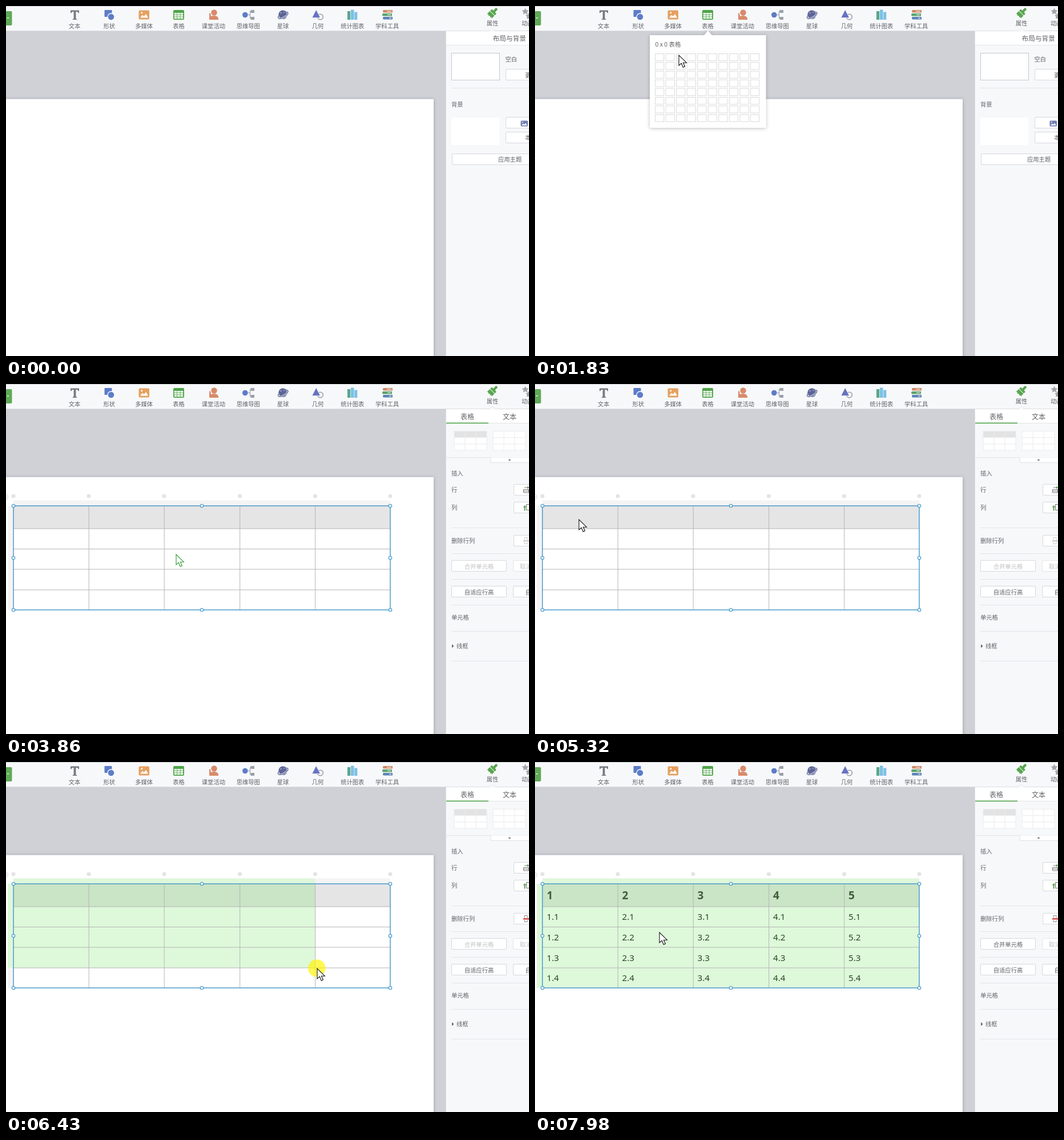
An HTML page for the animation above (8 s loop, 916x612 px).

```html
<!DOCTYPE html>
<html lang="zh">
<head>
<meta charset="utf-8">
<title>Insert table</title>
<style>
html, body { margin: 0; width: 100%; height: 100%; overflow: hidden; background: #d0d1d6; }
svg { display: block; }
text { font-family: "Noto Sans CJK SC", "Noto Sans CJK", "Noto Sans", sans-serif; }
.cell { font-family: "Noto Sans", "Open Sans", sans-serif; }
</style>
</head>
<body>
<svg id="stage" width="916" height="612" viewBox="0 0 916 612"></svg>
<script>
const LOOP = 8000;
const COLS = [13, 145, 277, 409.5, 541.5, 673];
const ROWS = [213, 253, 288.5, 324, 360, 395];
const BLUE = '#3f95c9', GREEN = '#58a64f', INK = '#606266';
const GRID = { x: 210.5, y: 83.5, dx: 18.55, dy: 15.2, cols: 10, rows: 8 };

// Screen updates come in bursts: start, end, number of steps.
const BURSTS = [
  [70, 860, 11], [970, 1730, 11], [1830, 2590, 11], [2690, 3070, 6], [3470, 3560, 2],
  [3710, 3860, 3], [3940, 4450, 7], [4520, 5320, 10], [5380, 5450, 2], [5640, 6430, 11],
  [6490, 6630, 3], [6890, 6970, 2], [7110, 7850, 10], [7940, 7980, 2]
];

// Pointer path: time, x, y.
const PATH = [
  [70, 545, 402], [400, 440, 225], [700, 320, 45], [860, 302, 16], [1050, 302, 16],
  [1400, 280, 46], [1730, 253, 78], [1760, 253, 78], [1830, 252, 86], [2200, 270, 112],
  [2590, 287, 135], [2690, 287, 137], [2960, 287, 147], [3560, 287, 147], [3710, 289, 180],
  [3860, 298, 298], [4080, 262, 306], [4450, 130, 246], [4520, 118, 244], [5320, 77, 237],
  [5560, 77, 237], [5640, 92, 240], [6000, 290, 292], [6340, 505, 350], [6430, 545, 361],
  [6630, 605, 370], [7030, 605, 370], [7110, 603, 374], [7260, 560, 385], [7560, 400, 362],
  [7850, 248, 319], [7980, 218, 298]
];

const range = n => [...Array(n).keys()];
const rect = (x, y, w, h, fill, more = '') =>
  `<rect x="${x}" y="${y}" width="${w}" height="${h}" fill="${fill}" ${more}/>`;
const circle = (x, y, r, fill, more = '') => `<circle cx="${x}" cy="${y}" r="${r}" fill="${fill}" ${more}/>`;
const path = (d, fill, more = '') => `<path d="${d}" fill="${fill}" ${more}/>`;
const line = (d, color, w = 1) => path(d, 'none', `stroke="${color}" stroke-width="${w}"`);
// y is the middle of the glyphs
const label = (s, x, y, size = 10.3, more = '') =>
  `<text x="${x}" y="${y + size * .38}" font-size="${size}" fill="${INK}" ${more}>${s}</text>`;
const mid = 'text-anchor="middle"';
const button = (x, y, w, h = 19, color = '#d6d8dc') =>
  rect(x + .5, y + .5, w, h, '#fff', `stroke="${color}" rx="1.5"`);
const rule = (y, x = 780) => line(`M${x} ${y + .5}H916`, '#e2e4e7');

function icons() {
  return path('M113 7.5h15v4.8h-1.5q-.4-2.4-2.4-2.4h-1.7v11.3q0 1.5 2 1.7v1.1h-7.8v-1.1q2-.2 2-1.7V9.9h-1.7q-2 0-2.4 2.4H113z', '#777b80')
    + rect(172.5, 7, 13, 12, '#5d7cc8', 'rx="1"') + circle(184, 19, 6, '#5d7cc8', 'stroke="#f7f8fa" stroke-width="1.4"')
    + rect(232.5, 7.5, 18.5, 16, '#e5a160', 'rx="2"') + path('M235 20.5l4-5 2.6 2.6 3.6-4 3.8 6.4z', '#fff') + circle(237.8, 11.8, 1.5, '#fff')
    + rect(293, 7, 19, 17, '#4ea548', 'rx="2"')
    + range(9).map(i => rect(294.7 + i % 3 * 5.4, 12 + (i / 3 | 0) * 3.7, 4.6, 2.8, '#fff')).join('')
    + circle(364.5, 11.5, 5.2, '#d98a6b') + path('M356 24v-11.5q1.6-.8 2.2.8l.8 4.7q5.5-2 9.5-.2 3.5 1.2 3.7 6.2z', '#d98a6b')
    + line('M424 15.5h3.5M431 9.5h-3.5v12h3.5', '#8c96a8') + circle(418.8, 15.5, 4.8, '#5d7cc8')
    + rect(428.5, 7, 6.5, 5, '#9aa0a8') + rect(428.5, 19, 6.5, 5, '#9aa0a8')
    + circle(485, 15.2, 7.8, '#5c6596') + circle(481.5, 12, 1.6, '#8f97bd') + circle(487, 11, 1.2, '#8f97bd')
    + '<g transform="rotate(-28 485 16)">' + line('M478 13.5C472 17 477 20.3 485 20.3S498 17 492 13.5', '#f7f8fa', 3)
    + line('M478 13.5C472 17 477 20.3 485 20.3S498 17 492 13.5', '#5c6596', 1.4) + '</g>'
    + circle(550.5, 19, 4.8, 'none', 'stroke="#9a9ca4" stroke-width="1.6"')
    + path('M536 20.5L543.2 6.5 550.5 20.5z', '#6672c2', 'stroke="#f7f8fa" stroke-width=".7"')
    + rect(598, 9, 5.2, 15, '#58a78d') + rect(604, 6.5, 5.5, 17.5, '#7cc0e4') + rect(610.3, 10.5, 5, 13.5, '#7cc0e4')
    + [['#d08866', 660, 7], ['#58a36c', 659, 13], ['#5b83b5', 660, 19]].map(([c, x, y], i) =>
        path(`M${x + 1} ${y}h16v4.6h-16q-2-2.3 0-4.6z`, c) + rect(x + 7 + i * 2, y + 1.6, 8 - i * 2, 1.2, '#f1ece6')).join('');
}

function toolbar() {
  const names = ['文本', '形状', '多媒体', '表格', '课堂活动', '思维导图', '星球', '几何', '统计图表', '学科工具'];
  return rect(0, 0, 916, 43, '#f7f8fa') + rect(0, 0, 916, 1, '#cdcfd3') + rect(0, 43, 916, 1, '#dcdee2')
    + rect(-4, 9, 14.5, 25, '#5fa957', 'rx="2"') + path('M1.5 20h4l-2 2z', '#fff')
    + icons() + names.map((s, i) => label(s, 120 + i * 60.85, 35, 10.3, mid)).join('')
    + `<g transform="rotate(45 852 12)">${rect(850, 1, 4.4, 8, '#58a64f', 'rx="1.5"')}${rect(846.5, 8.2, 11.5, 4, '#58a64f', 'rx="1"')}${path('M846.5 13.2h11.5v6.5l-2-1.2-1.5 1.8-2-1.6-2 1.8-1.8-1.6-2.2 1z', '#58a64f')}</g>`
    + label('属性', 852, 30.5, 10.3, mid) + label('动画', 903, 30.5)
    + path('M909.5 3.5l1.8 3.8 4.2.5-3 2.9.8 4.1-3.8-2-3.7 2 .7-4.1-3-2.9 4.2-.5z', '#a2a5aa')
    + path('M914.5 12l1.5 3v7l-4 0 .5-3.5-2.5-2.5 3.5-.5z', '#a2a5aa')
    + path('M846 44l6-4.5 6 4.5z', '#fff', 'stroke="#dcdee2" stroke-width=".8"') + rect(845, 44, 14, 2, '#fff');
}

function slidePanel() {
  return rect(771, 44, 145, 25, '#fff') + rule(68, 771) + label('布局与背景', 852.5, 57, 11.7)
    + rect(780.5, 82.5, 84, 47, '#fff', 'stroke="#c6c8cc"') + label('空白', 874.5, 93)
    + button(875, 110, 60) + label('更换布局', 909, 121) + rule(143) + label('背景', 780, 172.5)
    + rect(780, 195, 84, 48, '#fff') + button(875, 194, 60) + button(875, 220, 60)
    + rect(901.5, 200.5, 12.5, 10, '#6f7db3', 'rx="1.5"') + path('M903 208.8l3-3.4 2 1.8 2.3-2.5 2.4 4.1z', '#fff') + circle(904.7, 203.3, 1, '#fff')
    + label('本地图片', 909, 230.5) + button(781, 258, 150) + label('应用主题', 862, 268.5);
}

function thumb(x, head) {
  const grid = range(4).map(i => `M${x + i * 19} 82.5v33.5M${x} ${82.5 + i * 11.17}h57`).join('');
  return rect(x, 82.5, 57, 33.5, '#fff') + (head ? rect(x, 82.5, 57, 10.5, '#e3e3e3') : '') + line(grid, '#ebebec');
}

function tablePanel() {
  return rect(771, 44, 145, 25, '#fff') + rule(68, 771) + rect(771, 67.5, 74, 1.7, GREEN)
    + label('表格', 808, 57, 12, mid) + label('文本', 882, 57, 12, mid)
    + thumb(785, true) + thumb(853, false) + rule(128, 771)
    + path('M849 128.5v7q0 2 2 2h66v-9', '#fff', 'stroke="#dddfe3"') + path('M879.5 132h5l-2.5 2.6z', '#666')
    + label('插入', 780, 156) + label('行', 780, 185.5) + label('列', 780, 216)
    + [175, 206, 264].map(y => button(889, y, 40)).join('')
    + line('M906.5 184.5h9v5.5h-9zM906.5 187.2h9M908 181h8', '#777') + path('M913 178.5l3 2.5-3 2.5z', GREEN)
    + line('M911.5 210.5h6v10h-6z', '#777') + rect(907.5, 215, 2, 6.5, GREEN) + path('M905.5 215.5l3-3.5 3 3.5z', GREEN)
    + label('删除行列', 780, 274.5) + `<g id="del">${line('M908 272.5v-4h5v4M908 276.5v3h5v-3', '#888')}${path('M906 273h10v2.6h-10z', 'currentColor')}</g>`
    + [251, 296, 341, 386, 432, 484].map(y => rule(y)).join('')
    + button(780, 308, 96) + label('合并单元格', 828.5, 319, 10.3, mid + ' id="merge"')
    + button(888, 308, 40, 19, '#e3e5e8') + label('取消合并', 900, 319, 10.3, 'opacity=".4"')
    + button(780, 353, 96) + label('自适应行高', 828.5, 364, 10.3, mid)
    + button(888, 353, 40) + label('自适应列宽', 909.5, 364)
    + label('单元格', 780, 408.5) + path('M781 455l3.5 3.2-3.5 3.2z', '#666') + label('线框', 789, 458.5);
}

function table() {
  const [l, r, t, b] = [COLS[0], COLS[5], ROWS[0], ROWS[5]];
  const inner = COLS.slice(1, 5).map(x => `M${x + .2} ${t}V${b}`).concat(ROWS.slice(1, 5).map(y => `M${l} ${y}H${r}`)).join('');
  const words = range(25).map(i => {
    const c = i % 5, row = i / 5 | 0, y = (ROWS[row] + ROWS[row + 1]) / 2;
    return row
      ? `<text class="cell" x="${COLS[c] + 7.5}" y="${y + 5.6}" font-size="15.2" fill="#161616">${c + 1}.${row}</text>`
      : `<text class="cell" x="${COLS[c] + 7.5}" y="${y + 7}" font-size="19" font-weight="700" fill="#333">${c + 1}</text>`;
  }).join('');
  const handles = [l, 343, r].map(x => [t, 304, b].map(y =>
    x === 343 && y === 304 ? '' : circle(x, y, 2.7, '#fff', `stroke="${BLUE}" stroke-width="1.1"`)).join('')).join('');
  return rect(l, 203.5, r - l, 9.5, '#f4f4f4') + rect(3, t, 10, b - t, '#f4f4f4')
    + COLS.map(x => circle(x, 196, 3.6, '#e4e4e5')).join('')
    + circle(-1, 197.5, 4.6, '#fff', 'stroke="#d4d4d6"') + line('M-2 197.5h4', '#d4d4d6')
    + rect(l, t, r - l, b - t, '#fff') + rect(l, t, r - l, 40, '#e5e5e5')
    + `<g id="words">${words}</g><g id="sel">${rect(l, t, 0, 0, 'rgba(112,224,94,.23)', 'id="area"')}`
    + rect(l, 203.5, 0, 9.5, '#def7da', 'id="top"') + rect(3, t, 10, 0, '#def7da', 'id="side"') + '</g>'
    + line(inner, '#b4b5b4') + rect(l, t, r - l, b - t, 'none', `stroke="${BLUE}" stroke-width="1.4"`) + handles;
}

function popup() {
  const cells = range(GRID.cols * GRID.rows).map(i => rect(GRID.x + i % GRID.cols * GRID.dx,
    GRID.y + (i / GRID.cols | 0) * GRID.dy, 15.3, 12.3, '#fff', 'class="pick"')).join('');
  return path('M202 51H296.5L303 43 309.5 51H403.5q1 0 1 1V212q0 1-1 1H202q-1 0-1-1V52q0-1 1-1z', '#fff', 'filter="url(#soft)"')
    + label('', 210.5, 67.5, 10.5, 'id="size"') + cells;
}

const stage = document.getElementById('stage');
stage.innerHTML = `<defs><filter id="soft" x="-20%" y="-20%" width="140%" height="140%">
  <feDropShadow dx="0" dy="1" stdDeviation="3" flood-color="#000" flood-opacity=".25"/></filter></defs>`
  + rect(0, 0, 916, 612, '#d0d1d6')
  + rect(-20, 162.5, 769, 480, '#fff', 'filter="url(#soft)"') + rect(0, 162, 749, .8, '#c9cae0')
  + `<g id="table">${table()}</g>` + rect(771, 44, 145, 568, '#f7f8fa') + rect(770, 44, 1, 568, '#dcdee2')
  + `<g id="slidePanel">${slidePanel()}</g><g id="tablePanel">${tablePanel()}</g>` + toolbar()
  + `<g id="popup">${popup()}</g>`
  + circle(0, 0, 15.3, 'rgba(255,244,0,.68)', 'id="press"')
  + path('M0 0V18L4.3 14.2 7.3 21.2 10.4 19.8 7.4 13.2H13.4Z', '#fff', 'id="pointer" stroke-width="1.1"');

const el = {};
for (const node of stage.querySelectorAll('[id]')) el[node.id] = node;
const picks = [...stage.querySelectorAll('.pick')];
const show = (node, on) => { node.style.display = on ? '' : 'none'; };
const set = (node, attrs) => { for (const k in attrs) node.setAttribute(k, attrs[k]); };
const within = (t, a, b) => t >= a && t < b;

// Time of the latest screen update
function snap(t) {
  let last = 0;
  for (const [a, b, n] of BURSTS) {
    if (t < a) break;
    const gap = (b - a) / (n - 1);
    last = a + Math.min(n - 1, Math.floor((t - a) / gap + 1e-6)) * gap;
  }
  return last;
}

function pointerAt(t) {
  const i = PATH.findIndex(p => p[0] >= t);
  if (i < 0) return PATH[PATH.length - 1].slice(1);
  if (i === 0) return PATH[0].slice(1);
  const [a, ax, ay] = PATH[i - 1], [b, bx, by] = PATH[i];
  const k = (t - a) / (b - a);
  return [ax + (bx - ax) * k, ay + (by - ay) * k];
}

function draw(time) {
  const t = snap(time);
  const [x, y] = pointerAt(t);
  // hover and selection trail the pointer by one update
  const [hx, hy] = pointerAt(t - 80);
  const made = t >= 3710, selected = t >= 5450, merged = t >= 6890;

  show(el.pointer, t >= 70);
  set(el.pointer, { transform: `translate(${x} ${y})`, stroke: within(t, 3710, 4500) ? '#2c9a2c' : '#111' });
  show(el.press, within(t, 970, 1045) || within(t, 3470, 3560) || within(t, 5380, 6890));
  set(el.press, { cx: x - .7, cy: y - .5 });

  const open = within(t, 1045, 3710);
  show(el.popup, open);
  if (open) {
    const inside = hx >= GRID.x && hy >= GRID.y;
    const c = inside ? Math.floor((hx - GRID.x) / GRID.dx) + 1 : 0;
    const r = inside ? Math.floor((hy - GRID.y) / GRID.dy) + 1 : 0;
    el.size.textContent = `${c} x ${r} 表格`;
    picks.forEach((p, i) => set(p, { stroke: i % GRID.cols < c && i / GRID.cols < r ? GREEN : '#dadada' }));
  }

  show(el.table, made);
  show(el.tablePanel, made);
  show(el.slidePanel, !made);
  show(el.words, t >= 7110);
  show(el.sel, selected);
  if (selected) {
    const end = (edges, v) => edges.slice(1).find(e => e > v) || edges[5];
    const w = (merged ? COLS[5] : end(COLS, hx)) - COLS[0];
    const h = (merged ? ROWS[5] : end(ROWS, hy)) - ROWS[0];
    set(el.area, { width: w, height: h });
    set(el.top, { width: w });
    set(el.side, { height: h });
  }
  set(el.del, { color: selected ? '#d9504a' : '#999', opacity: selected ? 1 : .45 });
  set(el.merge, { opacity: merged ? 1 : .4 });
}

const start = performance.now();
function tick() {
  draw((performance.now() - start) % LOOP);
  requestAnimationFrame(tick);
}
tick();
</script>
</body>
</html>
```
